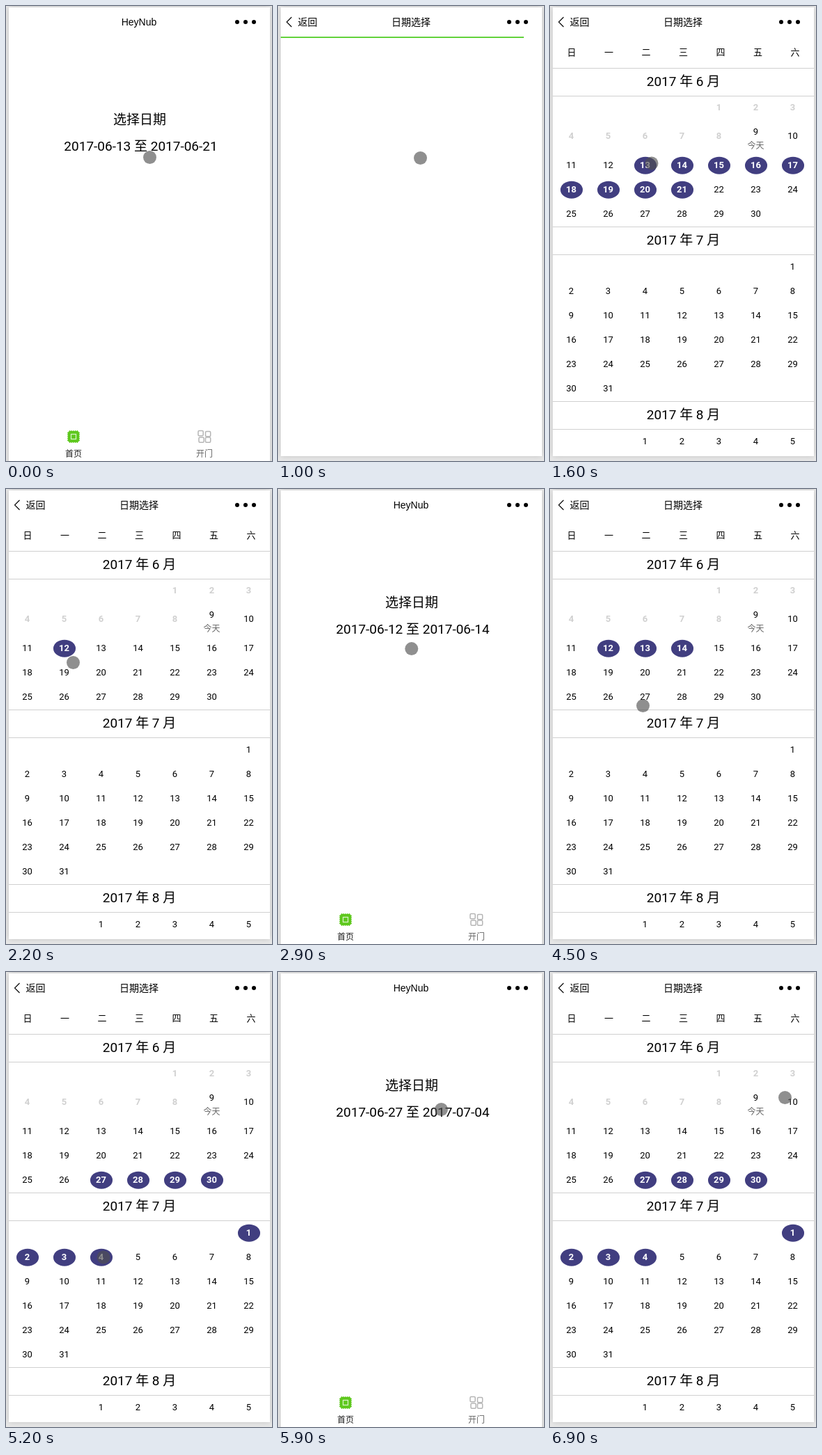
Animation of 382 by 654 pixels, one loop 7 s. Source, as an HTML page with a canvas:

```html
<!DOCTYPE html>
<html lang="zh-CN">
<head>
<meta charset="utf-8">
<title>日期选择</title>
<style>
html, body { margin: 0; width: 100%; height: 100%; overflow: hidden; background: #e8e8e8; }
canvas { display: block; }
</style>
</head>
<body>
<canvas id="stage" width="382" height="654"></canvas>
<script>
const ctx = document.getElementById('stage').getContext('2d');
const LOOP = 7000, STEP = 100;
const CJK = '"Noto Sans CJK SC", "Noto Sans CJK", sans-serif';
const BIG = 19, MID = 191.5;

// [start, view, first day, last day]; days count on from 1 June
const scenes = [
  [0, 'home', 13, 21], [800, 'load', 13, 21], [1100, 'calendar', 13, 21],
  [2000, 'calendar', 12, 12], [2600, 'calendar', 12, 14], [2900, 'home', 12, 14],
  [3900, 'load', 12, 14], [4200, 'calendar', 12, 14],
  [4700, 'calendar', 27, 27], [5100, 'calendar', 27, 34], [5400, 'home', 27, 34],
  [6000, 'load', 27, 34], [6300, 'calendar', 27, 34]
];

// [time, x, y]
const pointerPath = [
  [0, 206, 217], [500, 204, 217], [1000, 204, 218], [1300, 203, 218],
  [1900, 88, 233], [2200, 96, 249], [2600, 190, 233], [3100, 192, 227],
  [3800, 192, 174], [4000, 190, 178], [4500, 133, 311], [4700, 136, 303],
  [5100, 138, 411], [5300, 141, 408], [5900, 234, 197], [6200, 237, 198],
  [6900, 337, 180]
];

// Offset of day 1 from the running count, days shown, first weekday, title y, row centres
const months = [
  { number: 6, before: 0, days: 30, start: 4, title: 109, rows: [146, 187, 229, 264, 299] },
  { number: 7, before: 30, days: 31, start: 6, title: 337, rows: [375, 410, 445, 480, 515, 550] },
  { number: 8, before: 61, days: 5, start: 2, title: 588, rows: [626] }
];

function text(str, x, y, size, color = '#000', weight = '', family = 'Roboto') {
  ctx.font = `${weight} ${size}px "${family}", ${CJK}`;
  ctx.textAlign = 'center';
  ctx.fillStyle = color;
  ctx.fillText(str, x, Math.floor(y + size * 0.36));
}

function rect(x, y, w, h, color) {
  ctx.fillStyle = color;
  ctx.fillRect(x, y, w, h);
}

function oval(x, y, rx, ry, color) {
  ctx.fillStyle = color;
  ctx.beginPath();
  ctx.ellipse(x, y, rx, ry, 0, 0, Math.PI * 2);
  ctx.fill();
}

function roundRect(x, y, size, radius) {
  ctx.beginPath();
  ctx.roundRect(x, y, size, size, radius);
}

function drawPage(height) {
  rect(0, 0, 382, 654, '#e8e8e8');
  ctx.shadowColor = 'rgba(0,0,0,.17)';
  ctx.shadowBlur = 8;
  rect(4, 2, 375, height, '#fff');
  ctx.shadowColor = 'transparent';
  for (const x of [332, 344, 356]) oval(x, 23, 3, 3, '#000');
}

function drawHome(first, last) {
  const iso = d => `2017-0${d > 30 ? 7 : 6}-${String(d > 30 ? d - 30 : d).padStart(2, '0')}`;
  text('HeyNub', 191, 23, 14, '#000', '', 'Liberation Sans');
  text('选择日期', 192, 163.5, BIG);
  text(`${iso(first)} 至 ${iso(last)}`, 193.5, 201.5, BIG);

  const green = '#5fc81e';
  ctx.fillStyle = green;
  roundRect(89, 611, 16, 3);
  ctx.fill();
  for (let i = 0; i < 5; i++) {
    rect(91 + i * 2.7, 610, 1.3, 18, green);
    rect(88, 613 + i * 2.7, 18, 1.3, green);
  }
  ctx.strokeStyle = '#d5f2c4';
  ctx.lineWidth = 1.3;
  ctx.strokeRect(93.5, 615.5, 7, 7);
  text('首页', 97, 644, 12, '#222');

  ctx.strokeStyle = '#b5b5b5';
  ctx.lineWidth = 1.5;
  for (const [x, y] of [[276, 610.5], [286.5, 611.5], [277, 620], [286.5, 620]]) {
    roundRect(x, y, 7.2, 1.5);
    ctx.stroke();
  }
  text('开门', 285, 644, 12, '#666');
}

function drawHeader() {
  ctx.strokeStyle = '#000';
  ctx.lineWidth = 1.1;
  ctx.beginPath();
  ctx.moveTo(19.5, 16);
  ctx.lineTo(12.5, 23);
  ctx.lineTo(19.5, 30);
  ctx.stroke();
  text('返回', 42.5, 23, 14);
  text('日期选择', 191, 23, 14);
}

function drawCalendar(first, last) {
  [...'日一二三四五六'].forEach((name, i) => text(name, 31 + i * 53.5, 66.5, 13));
  for (const { number, before, days, start, title, rows } of months) {
    rect(4, title - 20, 375, 1, '#d0d0d0');
    rect(4, title + 20, 375, 1, '#d0d0d0');
    text(`2017 年 ${number} 月`, MID, title, BIG);
    for (let day = 1; day <= days; day++) {
      const cell = start + day - 1, count = before + day;
      const x = 30.5 + cell % 7 * 53;
      const y = rows[Math.floor(cell / 7)];
      if (count >= first && count <= last) {
        oval(x + 0.5, y + 0.2, 16, 12.5, '#413e80');
        text(day, x, y, 13, '#fff', 'bold');
      } else if (count < 9) {
        text(day, x, y, 13, '#d0d0d0', 'bold');
      } else if (count === 9) {
        text(day, x, y - 6, 13);
        text('今天', x, y + 14, 12, '#666');
      } else {
        text(day, x, y, 13);
      }
    }
  }
}

function drawPointer(time) {
  const next = pointerPath.findIndex(p => p[0] > time);
  const b = pointerPath.at(next), a = next > 0 ? pointerPath[next - 1] : b;
  const k = a === b ? 0 : (time - a[0]) / (b[0] - a[0]);
  const ease = k * k * (3 - 2 * k);
  const x = a[1] + (b[1] - a[1]) * ease, y = a[2] + (b[2] - a[2]) * ease;
  oval(x + 0.5, y + 0.5, 9.5, 9.5, 'rgba(80,80,80,.64)');
}

function draw(now) {
  const time = Math.floor(now % LOOP / STEP) * STEP;
  const [since, view, first, last] = scenes.findLast(s => s[0] <= time);
  drawPage(view === 'home' ? 700 : 645);
  if (view === 'home') drawHome(first, last);
  else drawHeader();
  if (view === 'load') rect(4, 44, 349 * (1 - (1 - (time - since) / 200) ** 2), 2, '#62d23c');
  if (view === 'calendar') drawCalendar(first, last);
  drawPointer(time);
}

const origin = performance.now();
function tick() {
  draw(performance.now() - origin);
  requestAnimationFrame(tick);
}
tick();
</script>
</body>
</html>
```
